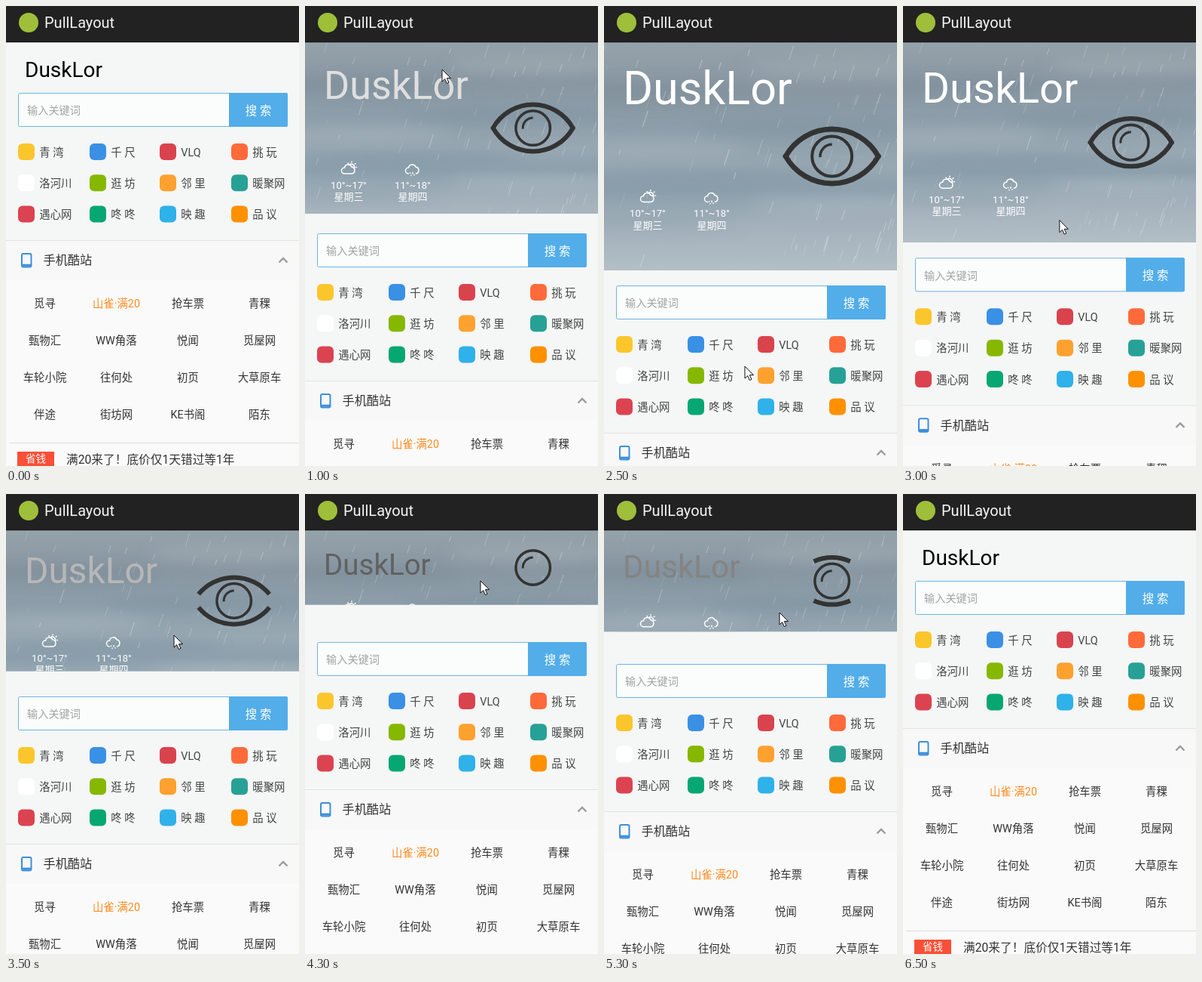
These frames come from a looping animation (389 px wide and 609 px high, 6900 ms). An HTML page:

```html
<!DOCTYPE html>
<html lang="zh-CN">
<head>
<meta charset="utf-8">
<title>PullLayout</title>
<style>
  html, body { margin: 0; width: 100%; height: 100%; overflow: hidden; background: #f5f6f6; }
  svg { display: block; width: 389px; height: 609px; }
  text { font-family: Roboto, "Noto Sans CJK SC", "Noto Sans CJK", sans-serif; white-space: pre; }
</style>
</head>
<body>
<svg viewBox="0 0 389 609">
  <defs>
    <linearGradient id="sky" x1="0" y1="0" x2="0" y2="1">
      <stop offset="0" stop-color="#95a2aa"/>
      <stop offset=".2" stop-color="#8897a2"/>
      <stop offset=".4" stop-color="#8e9fab"/>
      <stop offset=".54" stop-color="#98a8b3"/>
      <stop offset=".65" stop-color="#8b9fac"/>
      <stop offset=".8" stop-color="#a3b1bb"/>
      <stop offset="1" stop-color="#b3bec6"/>
    </linearGradient>
    <filter id="soft" x="-30%" y="-100%" width="160%" height="300%"><feGaussianBlur stdDeviation="9"/></filter>
    <clipPath id="window"><rect id="pane" y="48" width="389" height="0"/></clipPath>
  </defs>

  <rect width="389" height="609" fill="#f5f6f6"/>

  <g clip-path="url(#window)">
    <g id="photo">
      <rect width="389" height="260" fill="url(#sky)"/>
      <g filter="url(#soft)">
        <ellipse cx="90" cy="58" rx="120" ry="9" fill="#768894" opacity=".45"/>
        <ellipse cx="300" cy="30" rx="110" ry="10" fill="#a9b3b9" opacity=".5"/>
        <ellipse cx="270" cy="98" rx="140" ry="8" fill="#778b98" opacity=".4"/>
        <ellipse cx="80" cy="122" rx="110" ry="9" fill="#a7b5be" opacity=".6"/>
        <ellipse cx="140" cy="152" rx="150" ry="7" fill="#768d9c" opacity=".45"/>
        <ellipse cx="310" cy="186" rx="120" ry="9" fill="#b3bfc7" opacity=".5"/>
        <ellipse cx="70" cy="205" rx="110" ry="7" fill="#8da0ac" opacity=".5"/>
      </g>
      <g id="rain" stroke="#fff" stroke-width=".9"></g>
    </g>
    <g id="center">
      <g id="eye" fill="none" stroke="#333">
        <path id="lids" stroke-width="6"/>
        <circle r="22.8" stroke-width="3.5"/>
        <path d="M-13.5 1A13.5 13.5 0 0 1 0-13.5" stroke-width="3"/>
      </g>
      <g id="weather" fill="none" stroke="#fff" stroke-width="1.5" stroke-linecap="round"></g>
    </g>
  </g>

  <g id="page">
    <rect y="311" width="389" height="52" fill="#f8f8f8"/>
    <rect y="363" width="389" height="300" fill="#fafafa"/>
    <path d="M0 310.5H389" stroke="#e3e3e3"/>
    <rect x="16.5" y="115.5" width="357" height="44" rx="2" fill="#fbfcfc" stroke="#6fb5e2"/>
    <path d="M296 115H372a2 2 0 0 1 2 2V158a2 2 0 0 1-2 2H296Z" fill="#52ade9"/>
    <g fill="none" stroke="#3d8fdc">
      <rect x="21" y="328" width="12.5" height="17.5" rx="2" stroke-width="2"/>
      <path d="M21 343.2H33" stroke-width="3"/>
    </g>
    <path d="M362.500 339.500L368 334L373.500 339.500" fill="none" stroke="#9b9b9b" stroke-width="2.4"/>
    <path d="M4 578.500H389" stroke="#dcdcdc"/>
    <rect x="15" y="590" width="49" height="22" fill="#fa4f37"/>
  </g>

  <text id="title" font-size="28">DuskLor</text>

  <g id="bar">
    <rect width="389" height="48" fill="#222"/>
    <path d="M0 47.500H389" stroke="#151515"/>
    <path d="M0 48.500H389" stroke="#000" opacity=".2"/>
    <circle cx="30" cy="22" r="13" fill="#9fbf3b"/>
  </g>

  <path id="cursor" d="M0 0V16L3.700 12.600L6.300 18.500L8.900 17.400L6.400 11.600H11.500Z" fill="#fff" stroke="#111"/>
</svg>

<script>
const $ = id => document.getElementById(id);

function add(parent, tag, attrs, text) {
  const el = document.createElementNS('http://www.w3.org/2000/svg', tag);
  for (const k in attrs) el.setAttribute(k, attrs[k]);
  if (text) el.textContent = text;
  parent.append(el);
  return el;
}

// Text placed by its vertical middle
function label(parent, text, x, midY, size, fill, anchor = 'start') {
  add(parent, 'text', {
    x, y: midY + size * 0.37, 'font-size': size, fill, stroke: 'none', 'text-anchor': anchor
  }, text);
}

const page = $('page');
label($('bar'), 'PullLayout', 51, 22, 20, '#f4f4f4');
label(page, '输入关键词', 28, 138, 14.2, '#a3a3a3');
label(page, '搜 索', 335, 138, 15.4, '#fff', 'middle');
label(page, '手机酷站', 49.5, 336.5, 16.2, '#333');
label(page, '省钱', 39.5, 599.5, 13.5, '#fff', 'middle');
label(page, '满20来了！底价仅1天错过等1年', 80, 600.5, 15.7, '#333');

const apps = [
  ['青 湾', '#fbc62c'], ['千 尺', '#3a90e5'], ['VLQ', '#d9434e'], ['挑 玩', '#ff6a3a'],
  ['洛河川', '#ffffff'], ['逛 坊', '#86b800'], ['邻 里', '#ffa12f'], ['暖聚网', '#27a196'],
  ['遇心网', '#dc4350'], ['咚 咚', '#06a772'], ['映 趣', '#2fb1ea'], ['品 议', '#ff9000']
];
const appX = [16, 111, 204, 299];
apps.forEach(([name, fill], i) => {
  const x = appX[i % 4], y = 182 + Math.floor(i / 4) * 41.3;
  add(page, 'rect', { x, y, width: 22, height: 22, rx: 6, fill });
  label(page, name, x + 28.3, y + 11.3, 14.4, '#444');
});

const sites = ('觅寻 山雀·满20 抢车票 青稞 甄物汇 WW角落 悦闻 觅屋网 ' +
  '车轮小院 往何处 初页 大草原车 伴途 街坊网 KE书阁 陌东').split(' ');
sites.forEach((name, i) => {
  label(page, name, 51.5 + (i % 4) * 95, 394 + Math.floor(i / 4) * 49, 14.4,
    i === 1 ? '#ff8a1f' : '#333', 'middle');
});

const cloud = 'M-5.500 6.500A4 4 0 0 1-5.500-1.500A5 5 0 0 1 4-2.500A4.600 4.600 0 0 1 4.500 6.500';
const weather = $('weather');
[
  [58, '10°~17°', '星期三', cloud + 'ZM1.500-6A4.500 4.500 0 0 1 7.500-.500M4-9.500V-8.500M9-7L8.300-6.300M10.500-2H9.800M-1-7.500L-.500-7'],
  [143, '11°~18°', '星期四', cloud + 'M-3.500 5.500V6M0 5V6.500M-2 8.500V9M2 8V8.500']
].forEach(([x, range, day, d]) => {
  add(weather, 'path', { d, transform: `translate(${x} 54)` });
  label(weather, range, x, 75.5, 13, '#fff', 'middle');
  label(weather, day, x, 91, 13, '#fff', 'middle');
});
weather.setAttribute('transform', 'translate(0 0)');

let seed = 7;
const rnd = () => (seed = (seed * 16807) % 2147483647) / 2147483647;
for (let i = 0; i < 95; i++) {
  const x = rnd() * 389, y = rnd() * 250, len = 6 + rnd() * 13;
  add($('rain'), 'path', {
    d: `M${x} ${y}l${-len * 0.32} ${len}`, opacity: 0.1 + rnd() * 0.25
  });
}

// time, pull distance, cursor x, cursor y
const keys = [
  [0, 0, -99, 54], [100, 0, 287, 54], [400, 0, 182, 84], [800, 0, 182, 84],
  [900, 95, 182, 84], [1000, 186, 182, 84], [1100, 206, 182, 84], [1300, 213, 182, 84],
  [1400, 213, 182, 84], [1500, 213, 180, 130], [1700, 213, 190, 293], [1800, 213, 190, 293],
  [1900, 222, 189, 332], [2300, 254, 187, 473], [2400, 254, 187, 473], [2500, 255, 187, 477],
  [3100, 211, 212, 245], [3500, 153, 223, 187], [3800, 106, 228, 140], [4300, 81, 233, 115],
  [4800, 71, 233, 106], [5200, 108, 233, 154], [5300, 110, 233, 157], [5500, 110, 233, 157],
  [5700, 104, 233, 151], [5900, 104, 233, 151], [6000, 60, 233, 151], [6100, 17, 233, 151],
  [6200, 5, 233, 151], [6400, 0, 233, 151], [6500, 0, -99, 151]
];
const LOOP = 6900, STEP = 100, OPEN = 213, FULL = 260;

function sample(t) {
  const i = keys.findIndex(k => k[0] > t);
  if (i < 0) return keys[keys.length - 1].slice(1);
  const a = keys[i - 1], b = keys[i], f = (t - a[0]) / (b[0] - a[0]);
  return [1, 2, 3].map(n => a[n] + (b[n] - a[n]) * f);
}

function lidPath(f) {
  if (f <= 0) return '';
  const R = 60.8, a = f * 1.06, x = R * Math.sin(a), y = R - 31 - R * Math.cos(a);
  return `M${-x} ${y}A${R} ${R} 0 0 1 ${x} ${y}M${-x} ${-y}A${R} ${R} 0 0 0 ${x} ${-y}`;
}

const move = (id, value) => $(id).setAttribute('transform', value);

function draw(t) {
  const [pull, cx, cy] = sample(Math.floor(t / STEP) * STEP);
  const base = Math.min(pull, OPEN), over = pull - base;
  const h = base * FULL / OPEN + over;
  const zoom = Math.max(1, h / FULL);

  $('pane').setAttribute('height', h);
  move('photo', `translate(${194.5 * (1 - zoom)} 48) scale(${zoom})`);
  move('center', `translate(0 ${48 + h / 2})`);
  move('eye', `translate(302.700 0) scale(${zoom})`);
  const open = Math.min(1, Math.max(0, (pull - 81) / 89) ** 0.85);
  $('lids').setAttribute('d', lidPath(open));
  $('lids').setAttribute('stroke-linecap', open < 1 ? 'butt' : 'round');

  move('page', `translate(0 ${pull})`);
  const grey = Math.round(255 * base / OPEN);
  $('title').setAttribute('fill', `rgb(${grey},${grey},${grey})`);
  move('title', `translate(25 ${94 + base * 0.158 + over * 0.06}) scale(${1 + pull * 0.00464})`);
  move('cursor', `translate(${cx} ${cy})`);
}

const start = performance.now();
function frame() {
  draw((performance.now() - start) % LOOP);
  requestAnimationFrame(frame);
}
frame();
</script>
</body>
</html>
```
